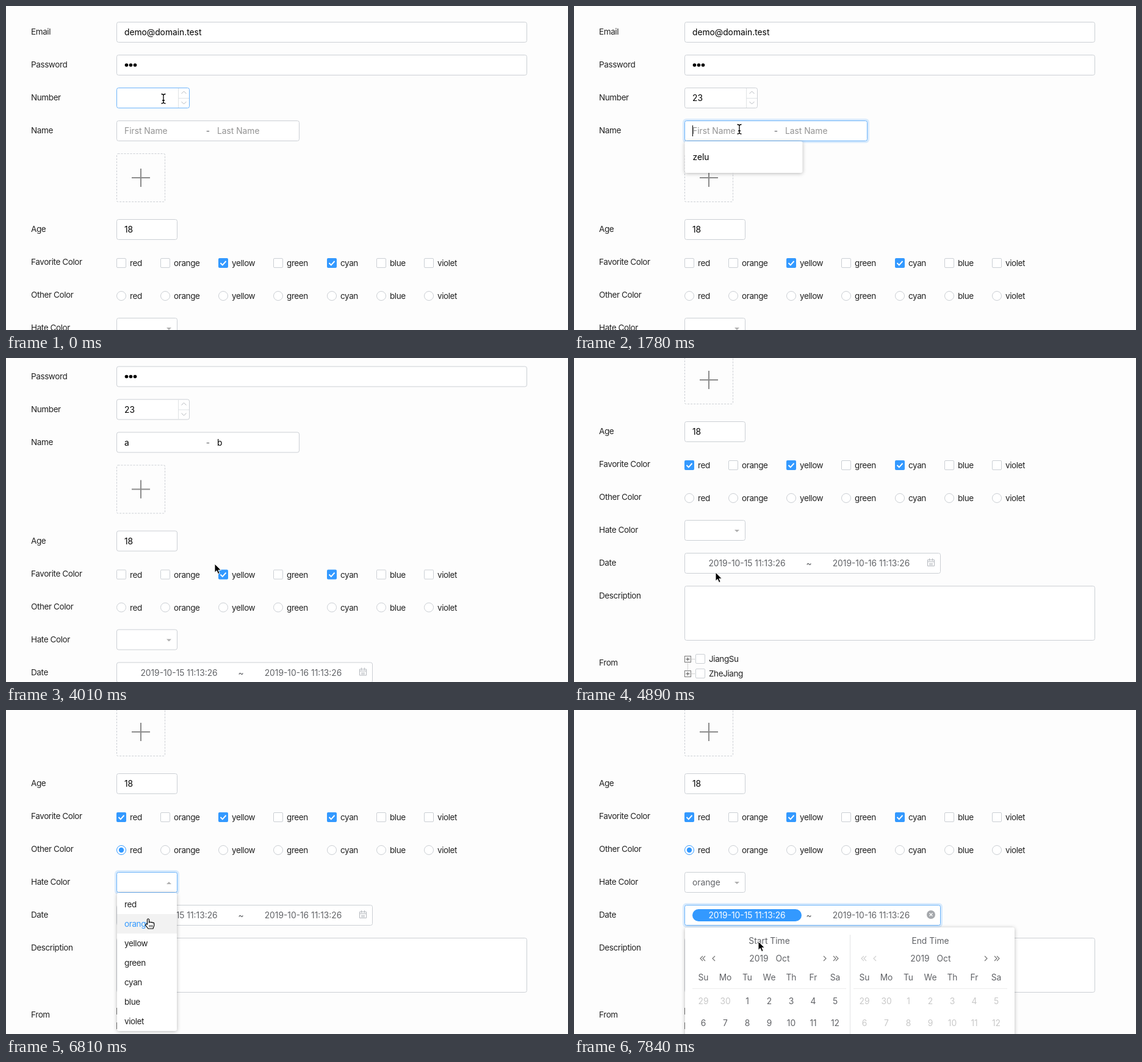
Recreate the animation shown at these times as an HTML page. Size 921x532 px, loop 7990 ms.

```html
<!DOCTYPE html>
<html lang="en">
<head>
<meta charset="utf-8">
<title>Form demo</title>
<style>
html, body { margin: 0; width: 100%; height: 100%; overflow: hidden; background: #fdfdfd; }
svg { display: block; width: 921px; height: 532px; }
text { font: 13.5px Inter, sans-serif; letter-spacing: -.4px; fill: #222; white-space: pre; }
.val { font-size: 13.8px; letter-spacing: 0; fill: #000; }
.hint { font-size: 13.8px; letter-spacing: 0; fill: #939393; }
.soft { font-size: 13.8px; letter-spacing: 0; fill: #606266; }
.off { font-size: 13.8px; letter-spacing: 0; fill: #c8c8c8; }
.white { font-size: 13.8px; letter-spacing: 0; fill: #fff; }
.hot { fill: #3399ff; }
.mid { text-anchor: middle; }
.pop { fill: #fff; filter: drop-shadow(0 1px 3px rgba(0,0,0,.28)); }
</style>
</head>
<body>
<svg id="stage" viewBox="0 0 921 532"></svg>
<script>
const DURATION = 7990, STEPS = 54;
const BLUE = '#3399ff', LINE = '#cbcfd4';
const stage = document.getElementById('stage');
const colors = ['red', 'orange', 'yellow', 'green', 'cyan', 'blue', 'violet'];
const optionX = [181, 253, 348, 438, 526, 607, 685];

// [step, x, y, shape]; positions between keys are linear
const pointerKeys = [
  [0, 258, 152, 'beam'], [1, 258, 152, 'beam'], [2, 290, 172, 'arrow'], [4, 545, 240, 'arrow'],
  [5, 547, 239, 'arrow'], [7, 340, 208, 'beam'], [8, 271, 202, 'beam'], [13, 271, 202, 'beam'],
  [14, 399, 205, 'beam'], [19, 399, 205, 'beam'], [20, 392, 235, 'arrow'], [23, 350, 338, 'arrow'],
  [25, 342, 338, 'arrow'], [27, 342, 338, 'arrow'], [29, 190, 349, 'hand'], [30, 190, 349, 'hand'],
  [31, 196, 349, 'arrow'], [33, 232, 352, 'arrow'], [34, 232, 350, 'beam'], [36, 210, 290, 'arrow'],
  [38, 189, 228, 'hand'], [40, 190, 227, 'hand'], [41, 200, 168, 'arrow'], [42, 203, 181, 'arrow'],
  [44, 230, 283, 'hand'], [45, 231, 288, 'hand'], [46, 233, 343, 'hand'], [47, 234, 343, 'hand'],
  [49, 268, 339, 'beam'], [50, 272, 339, 'beam'], [52, 302, 380, 'arrow'], [53, 306, 392, 'arrow']
];
const scrollKeys = [[0, 0], [24, 0], [25, 10], [26, 10], [27, 66.5], [28, 70], [30, 70], [31, 120], [32, 220], [33, 246]];

const between = (n, from, to) => n >= from && n < to;

function sample(keys, n) {
  const i = keys.findLastIndex(k => k[0] <= n), a = keys[i], b = keys[i + 1] || a;
  const p = b === a ? 0 : (n - a[0]) / (b[0] - a[0]);
  return a.map((v, j) => typeof v === 'number' ? v + (b[j] - v) * p : v);
}

const text = (x, y, s, cls = '') => `<text x="${x}" y="${y}" class="${cls}">${s}</text>`;
const path = (d, stroke = LINE, width = 1, extra = '') =>
  `<path d="${d}" fill="none" stroke="${stroke}" stroke-width="${width}" ${extra}/>`;
const rect = (x, y, w, h, r, attrs) => `<rect x="${x}" y="${y}" width="${w}" height="${h}" rx="${r}" ${attrs}/>`;

// state: 0 idle, 1 hovered, 2 focused
function field(y, w, h = 34, state = 0) {
  const glow = state === 2 ? rect(178, y - 3, w + 6, h + 6, 6, 'fill="#d9ebfd"') : '';
  return glow + rect(181.5, y + .5, w - 1, h - 1, 3, `fill="#fff" stroke="${state ? '#6bb3fa' : LINE}"`);
}

const caret = (x, y) => path(`M${x} ${y}v18`, '#000');

function checkbox(x, y, on, size = 16) {
  return on
    ? rect(x, y, size, size, 2, `fill="${BLUE}"`) + path(`M${x + 3.5} ${y + 8}l3.3 3.3 5.7-6.3`, '#fff', 1.9)
    : rect(x + .5, y + .5, size - 1, size - 1, 1.5, `fill="#fff" stroke="${LINE}"`);
}

function radio(x, y, on) {
  const dot = on ? `<circle cx="${x}" cy="${y}" r="4.2" fill="${BLUE}"/>` : '';
  return `<circle cx="${x}" cy="${y}" r="7.5" fill="#fff" stroke="${on ? BLUE : LINE}"/>` + dot;
}

function labels() {
  const rows = { Email: 47, Password: 101, Number: 155, Name: 209, Age: 371, 'Favorite Color': 425,
    'Other Color': 479, 'Hate Color': 533, Date: 587, Description: 641, From: 751 };
  return Object.entries(rows).map(([s, y]) => text(41, y, s)).join('');
}

function account(n) {
  const number = n < 3 ? '' : n < 4 ? '2' : '23';
  const dots = [197.5, 204.5, 211.5].map(x => `<circle cx="${x}" cy="97" r="2.8"/>`).join('');
  return field(26, 673) + text(194, 48, 'demo@domain.test', 'val') + field(80, 673) + dots
    + field(134, 120, 34, n < 1 ? 1 : n < 8 ? 2 : 0) + text(194, 156, number, 'val')
    + path('M282.5 135v32M283 151.5h17', '#dfe2e5')
    + path('M287.5 144l4-4 4 4M287.5 157l4 4 4-4', '#b5b9be')
    + (between(n, 1, 8) ? caret(194.5 + number.length * 8.5, 142) : '');
}

function fullName(n) {
  const caretX = n === 12 ? 194.5 : between(n, 13, 16) ? 202.5 : between(n, 16, 19) ? 346.5 : between(n, 19, 22) ? 355.5 : 0;
  return field(188, 300, 34, n < 8 || n >= 22 ? 0 : n < 9 ? 1 : 2)
    + (n < 13 ? text(194, 210, 'First Name', 'hint') : text(194, 210, 'a', 'val'))
    + text(331, 210, '-', 'soft mid')
    + (n < 19 ? text(346, 210, 'Last Name', 'hint') : text(346, 210, 'b', 'val'))
    + (caretX ? caret(caretX, 196) : '');
}

const upload = () => rect(181.5, 242.5, 79, 79, 2, `fill="#fdfdfd" stroke="${LINE}" stroke-dasharray="3 2"`)
  + path('M206 282h30M221 267v30', '#8c8c8c', 2);

function choices(n) {
  return colors.map((c, i) => {
    const x = optionX[i];
    return checkbox(x, 414, i === 2 || i === 4 || (i === 0 && n >= 30)) + text(x + 22, 427, c)
      + radio(x + 8, 476, i === 0 && n >= 39) + text(x + 22, 481, c);
  }).join('');
}

function hateColor(n) {
  const open = between(n, 45, 47);
  return field(512, 100, 34, between(n, 45, 51) ? 2 : n === 44 ? 1 : 0)
    + (n >= 47 ? text(194, 534, 'orange', 'soft') : '')
    + `<path d="M263 ${open ? 532 : 528}h8l-4 ${open ? -4 : 4}z" fill="#b0b0b0"/>`;
}

function dates(n) {
  const active = n >= 50;
  const icon = n >= 49
    ? '<circle cx="585" cy="582" r="7" fill="#a5a8ac"/>' + path('M582.5 579.5l5 5m0-5l-5 5', '#fff', 1.2)
    : path('M579.5 577.5h11v10h-11zM579.5 580.5h11M582.5 575v4M587.5 575v4M582 583.5h6M582 585.5h6', '#b5b9be');
  return field(566, 420, 34, active ? 2 : between(n, 34, 36) || n === 49 ? 1 : 0)
    + (active ? rect(194, 573, 179, 20, 10, `fill="${BLUE}"`) : '')
    + text(283.5, 588, '2019-10-15 11:13:26', 'mid ' + (active ? 'white' : 'soft'))
    + text(385, 588, '~', 'soft mid') + text(487, 588, '2019-10-16 11:13:26', 'soft mid') + icon;
}

function tree() {
  return ['JiangSu', 'ZheJiang'].map((s, i) => {
    const y = 735 + i * 24;
    return rect(181.5, y + .5, 10, 10, 0, 'fill="#fff" stroke="#777"')
      + path(`M183.5 ${y + 5.5}h6M186.5 ${y + 2.5}v6`, '#555')
      + path(`M193 ${y + 5.5}h6`, '#aaa', 1, 'stroke-dasharray="1 1"')
      + checkbox(199, y - 3, false) + text(221, y + 10, s);
  }).join('') + path('M186.5 747v11', '#aaa', 1, 'stroke-dasharray="1 1"');
}

const suggestion = (x, word) => rect(x, 222, 193, 52, 3, 'class="pop"') + text(x + 13, 253, word, 'val');

const colorMenu = () => rect(182, 546, 98, 227, 3, 'class="pop"') + rect(182, 581, 98, 32, 0, 'fill="#f2f2f2"')
  + colors.map((c, i) => text(194, 570 + i * 32, c, i === 1 ? 'hot' : '')).join('');

function month(x, title, first) {
  const arrow = (cx, dir, stroke) => path(`M${cx + 2 * dir} 650l${-4 * dir} 4 ${4 * dir} 4`, stroke, 1.2);
  const dim = first ? '#777' : '#d0d0d0';
  const days = [...Array(14)].map((_, i) => {
    const number = i < 2 ? 29 + i : i - 1;
    return text(x + 30 + i % 7 * 36, 729 + Math.floor(i / 7) * 36, number, 'mid ' + (first && i > 1 ? 'soft' : 'off'));
  }).join('');
  return text(x + 138, 630, title, 'soft mid') + text(x + 121, 659, '2019', 'soft mid') + text(x + 160, 659, 'Oct', 'soft mid')
    + arrow(x + 27, 1, dim) + arrow(x + 31, 1, dim) + arrow(x + 47, 1, dim)
    + arrow(x + 229, -1, '#777') + arrow(x + 245, -1, '#777') + arrow(x + 249, -1, '#777')
    + ['Su', 'Mo', 'Tu', 'We', 'Th', 'Fr', 'Sa'].map((d, i) => text(x + 30 + i * 36, 690, d, 'soft mid')).join('')
    + path(`M${x + 12} 703.5h252`, '#ececec') + days;
}

const calendar = n => `<g opacity="${n < 52 ? .6 : 1}">` + rect(182, 603, 540, 330, 3, 'class="pop"')
  + path('M452.5 615v300', '#e2e4e6') + month(182, 'Start Time', true) + month(446, 'End Time', false) + '</g>';

function popups(n) {
  if (between(n, 10, 13)) return suggestion(181.5, 'zelu');
  if (between(n, 16, 19)) return suggestion(333.5, 'orvan');
  if (between(n, 45, 47)) return colorMenu();
  return n >= 51 ? calendar(n) : '';
}

const shapes = {
  arrow: '<path d="M0 0V14.3L3.3 11.2 5.6 16.6 8.2 15.5 5.9 10.3H10.4Z" stroke="#fff" stroke-width="1"/>',
  beam: path('M-3.5-7.5Q0-7.5 0-5V5.5Q0 8-3.5 8M3.5-7.5Q0-7.5 0-5V5.5Q0 8 3.5 8M-2 3h4', '#fff', 3)
    + path('M-3.5-7.5Q0-7.5 0-5V5.5Q0 8-3.5 8M3.5-7.5Q0-7.5 0-5V5.5Q0 8 3.5 8M-2 3h4', '#000', 1.3),
  hand: '<path d="M-1.5 9V1Q0-1.5 1.5 1V6Q3 4 4.5 6 6 4.5 7.3 6.5 9.5 5.5 9.7 8V11L8 16H0L-4.5 10Q-4 7.5-1.5 9Z" fill="#fff" stroke="#000" stroke-width="1.2"/>'
    + path('M2 10v3.5M4.3 10v3.5M6.6 10v3.5', '#000', .9)
};

function render(n) {
  const [, scroll] = sample(scrollKeys, n), [, x, y, shape] = sample(pointerKeys, n);
  stage.innerHTML = `<g transform="translate(0 ${-scroll})">`
    + labels() + account(n) + fullName(n) + upload() + field(350, 100) + text(194, 372, '18', 'val')
    + choices(n) + hateColor(n) + dates(n) + field(620, 673, 90) + tree() + popups(n)
    + `</g><g transform="translate(${x} ${y})">${shapes[shape]}</g>`;
}

let shown = -1;
function tick() {
  const step = Math.floor(performance.now() % DURATION / DURATION * STEPS);
  if (step !== shown) render(shown = step);
  requestAnimationFrame(tick);
}
tick();
</script>
</body>
</html>
```
